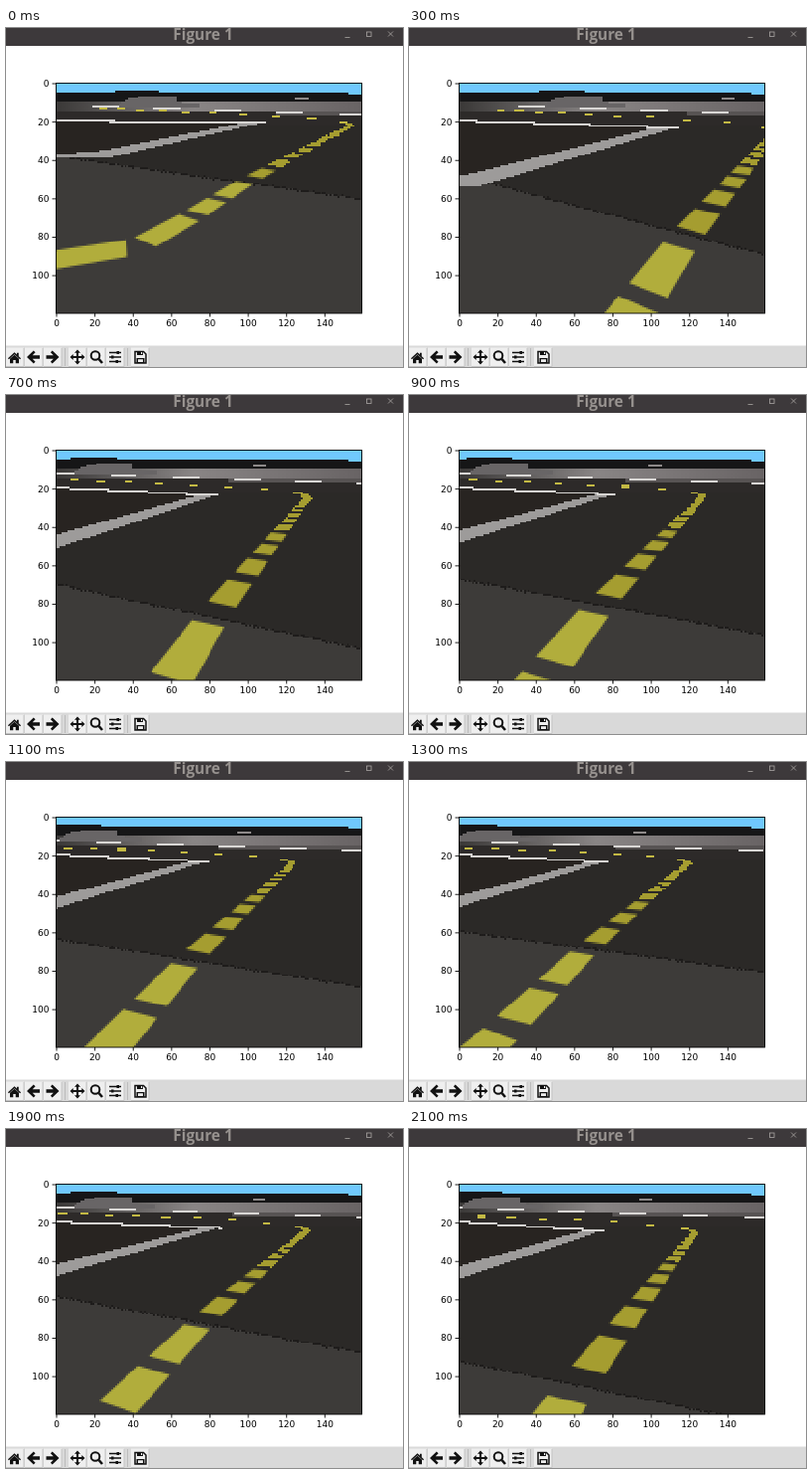
Recreate the animation shown at these times as an HTML page with a canvas. Size 400x341 px, loop 2.2 s.

```html
<!DOCTYPE html>
<html lang="en">
<head>
<meta charset="utf-8">
<title>Figure 1</title>
<style>
html, body { margin: 0; width: 100%; height: 100%; overflow: hidden; background: #fff; }
canvas { position: absolute; left: 50px; top: 55px; width: 309px; height: 232px; image-rendering: pixelated; }
svg { position: absolute; left: 0; top: 0; }
.tick { font: 9px "DejaVu Sans", sans-serif; }
.title { font: bold 15.4px "Open Sans", "Noto Sans", sans-serif; fill: #96918e; }
</style>
</head>
<body>
<canvas id="view" width="160" height="120"></canvas>
<svg width="400" height="341" viewBox="0 0 400 341">
  <rect width="400" height="18" fill="#3d393b"/>
  <text class="title" x="198.500" y="11.500" text-anchor="middle">Figure 1</text>
  <g fill="none" stroke="#aaa6a3" stroke-width=".8">
    <path d="M341.500 9.500h5M385 3.500l5 5m0-5l-5 5"/>
    <rect x="363.500" y="4" width="4.500" height="4.500"/>
  </g>
  <rect x="50.500" y="55.500" width="308" height="231.500" fill="none" stroke="#000" stroke-width=".9"/>
  <g id="axes" stroke-width=".9"></g>
  <rect y="319.500" width="400" height="21.500" fill="#d9d9d9"/>
  <g id="buttons"></g>
  <path d="M59.500 322v18M122.500 322v18" stroke="#bcbcbc"/>
  <g fill="#111" stroke="#111" stroke-width="0">
    <path transform="translate(8.500 331.500) scale(.82) translate(-9 -331)" d="M1 332l8-7.500 3 2.800v-2h2.200v4.200l2.800 2.500-1.200 1.200-6.800-6.200-6.800 6.200zM3.500 332.500l5.500-5 5.500 5v5.500h-4v-4h-3v4h-4z"/>
    <path id="arrow" d="M21 331l6.800-6.500 1.800 1.800-2.900 2.900h7.300v3.600h-7.300l2.900 2.900-1.800 1.800z"/>
    <use href="#arrow" transform="matrix(-1 0 0 1 74.500 0)"/>
    <path d="M72 323.500l3 3.200h-2v3.300h3.300v-2l3.200 3-3.200 3v-2h-3.300v3.300h2l-3 3.200-3-3.200h2v-3.300h-3.300v2l-3.200-3 3.200-3v2h3.300v-3.300h-2z"/>
    <circle cx="90" cy="329.500" r="4.300" fill="none" stroke-width="2"/>
    <path d="M93.500 333l3.500 4" stroke-width="2.600"/>
    <path d="M104 326.500h12M104 331h12M104 335.500h12" stroke-width="1.400"/>
    <path d="M111.500 325h2.500v3h-2.500zM106 329.500h2.500v3h-2.500zM110.500 334h2.500v3h-2.500z"/>
    <path d="M130 325.500h8.500l2.500 2.500v9h-11z" fill="none" stroke-width="1.500"/>
    <path d="M132 325.500h6v3.500h-6zM131.500 332h8v5h-8z"/>
    <path d="M136 326h1.200v2h-1.200zM133 333.300h5v2.700h-5z" fill="#eee"/>
  </g>
</svg>
<script>
const LEFT = 50, TOP = 55, RIGHT = 359, BOTTOM = 287, SCALE = 1.931;
const HORIZON = 68.5, MIDDLE = 204.5, FOCAL = 284;
const STEP = 100, LOOP = 2200;

const toGround = ([x, y]) => [(x - MIDDLE) / (y - HORIZON), FOCAL / (y - HORIZON)];
const toScreen = ([x, z]) => [MIDDLE + x * FOCAL / z, HORIZON + FOCAL / z];
const lerp = (a, b, u) => a + (b - a) * u;
const mix = (a, b, u) => a.map((v, i) => lerp(v, b[i], u));

// A camera pose: where the centre line meets the road joint, where it starts to curl away,
// and the height of the joint at both edges of the picture.
const pose = (t, joint, bend, seam) => ({ t, joint: toGround(joint), bend: toGround(bend), seam });
const poses = [
  pose(0, [245.5, 152], [347, 98], [128.5, 172]),
  pose(300, [278, 210], [370, 104.5], [148, 228]),
  pose(700, [211, 218], [304, 103], [190, 255]),
  pose(900, [194, 209], [296, 102], [185, 241]),
  pose(1300, [181, 186], [281, 102], [170, 211]),
  pose(1900, [199.5, 191], [303, 101.5], [168, 225]),
  pose(2100, [171, 254], [287, 104.5], [233, 296])
];

// Centre line in road units: joint at 0, bend at 1, sideways to the right positive.
function centre(s) {
  if (s < 0) return [s, -0.06 * s - 5.5 * Math.max(0, -0.2 - s) ** 2];
  const u = Math.max(0, s - 1);
  return [Math.min(s, 1) + 0.45 * (1 - Math.exp(-2.2 * u)), -u * u / (u + 0.5)];
}

// Dashes as [start, end] along the centre line.
const dashes = Array.from({ length: 13 }, (_, i) => [0.017 + 0.087 * i, 0.075 + 0.087 * i]);
let end = -0.021;
for (const length of [0.069, 0.044, 0.062, 0.06]) {
  dashes.push([end - length, end]);
  end -= length + 0.016;
}
const HALF_WIDTH = 0.108;

// Side line in road units, flaring out below the joint.
const band = [[-0.03, -0.32], [0.95, -0.385], [0.95, -0.46], [0, -0.4], [-0.1, -0.46], [-0.08, -0.38]];

const ctx = document.getElementById('view').getContext('2d');
const col = x => Math.round((x - LEFT) / SCALE);
const row = y => Math.round((y - TOP) / SCALE);

function box(color, x0, y0, x1, y1) {
  ctx.fillStyle = color;
  ctx.fillRect(col(x0), row(y0), Math.max(1, col(x1) - col(x0)), Math.max(1, row(y1) - row(y0)));
}

// Hard-edged polygon, filled row by row.
function poly(color, pts) {
  ctx.fillStyle = color;
  for (let r = 0; r < 120; r++) {
    const y = TOP + (r + 0.5) * SCALE, cuts = [];
    pts.forEach(([x0, y0], i) => {
      const [x1, y1] = pts[(i + 1) % pts.length];
      if (y0 <= y !== y1 <= y) cuts.push(col(lerp(x0, x1, (y - y0) / (y1 - y0))));
    });
    cuts.sort((a, b) => a - b);
    for (let i = 0; i + 1 < cuts.length; i += 2) ctx.fillRect(cuts[i], r, cuts[i + 1] - cuts[i], 1);
  }
}

function softPoly(color, pts) {
  ctx.fillStyle = color;
  ctx.beginPath();
  for (const [x, y] of pts) ctx.lineTo((x - LEFT) / SCALE, (y - TOP) / SCALE);
  ctx.fill();
}

function drawFar(far, tip) {
  box('#70c8fd', LEFT, TOP, RIGHT, 65);
  box('#161617', LEFT, 65, RIGHT, 77);
  box('#161617', far - 8, 63, far + 38, 65);
  box('#70c8fd', 346, 65, RIGHT, 67);
  const glow = ctx.createLinearGradient(0, 0, 160, 0);
  glow.addColorStop(0, '#3a3837');
  glow.addColorStop(0.45, '#898585');
  glow.addColorStop(1, '#686364');
  box(glow, LEFT, 75, RIGHT, 84);
  poly('#686566', [[far - 8, 80], [far + 4, 72], [far + 18, 69], [far + 54, 69], [far + 54, 75], [far + 78, 76], [far + 78, 80]]);
  box('#8d8989', far + 175, 71, far + 188, 73);
  box('#2d2a29', LEFT, 84, RIGHT, 97);
  box('#575353', tip + 10, 84, RIGHT, 88);
  for (let i = 0; i < 6; i++) {
    const x = far - 30 + 62 * i;
    box('#d9d7d5', x, 79 + 1.6 * i, x + 26, 81 + 1.6 * i);
  }
}

function drawSeam(seamL, seamR) {
  poly('#3d3b39', [[LEFT, seamL], [RIGHT, seamR], [RIGHT, 400], [LEFT, 400]]);
  for (let x = LEFT; x < RIGHT; x += SCALE) {
    const wobble = Math.sin(x * 1.7) + Math.sin(x * 0.61);
    const y = lerp(seamL, seamR, (x - LEFT) / (RIGHT - LEFT)) + wobble / 2;
    if (wobble > -0.4) box('#1e1c1b', x, y - 1, x + 2, y + 1);
  }
}

function drawDash(place, s0, s1) {
  const a = place(centre(s0)), b = place(centre(s1));
  if (Math.min(a[1], b[1]) < 0.5) return;
  const k = HALF_WIDTH / Math.hypot(b[0] - a[0], b[1] - a[1]);
  const nx = (b[1] - a[1]) * k, nz = (a[0] - b[0]) * k;
  const pts = [[a, -1], [a, 1], [b, 1], [b, -1]].map(([p, w]) => toScreen([p[0] + nx * w, p[1] + nz * w]));
  const color = s0 < 0 ? '#b1ad3c' : '#a59d30';
  (a[1] < 4 ? softPoly : poly)(color, pts);
  if (a[1] > 6) {
    const [x, y] = toScreen(mix(a, b, 0.5));
    box(color, x - 4, y, x + 4, y + 2);
  }
}

function draw(time) {
  let n = 0;
  while (n < poses.length - 2 && poses[n + 1].t <= time) n++;
  const a = poses[n], b = poses[n + 1], u = (time - a.t) / (b.t - a.t);
  const joint = mix(a.joint, b.joint, u), bend = mix(a.bend, b.bend, u);
  const dx = bend[0] - joint[0], dz = bend[1] - joint[1];
  const place = ([along, side]) => [joint[0] + along * dx + side * dz, joint[1] + along * dz - side * dx];

  const line = band.map(p => toScreen(place(p)));
  const tip = line[1], rim = 92;
  box('#2b2927', LEFT, TOP, RIGHT, BOTTOM);
  drawFar(toScreen(bend)[0] - 230, tip[0]);
  poly('#282421', [[LEFT, rim], tip, line[0], [LEFT, line[0][1]]]);
  drawSeam(...mix(a.seam, b.seam, u));
  poly('#9d9b9a', line);
  for (let x = LEFT; x < tip[0]; x += SCALE) {
    const y = lerp(rim, tip[1], (x - LEFT) / (tip[0] - LEFT));
    box('#d6d4d2', x, y, x + 2, y + 2);
  }
  for (let s = 1.2; s < 4; s += 0.3) {
    const [x, y] = toScreen(place(centre(s)));
    if (x > LEFT && x < RIGHT) box('#c3b944', x - 4, y - 1, x + 4, y + 1);
  }
  for (const dash of dashes) drawDash(place, ...dash);
}

let axes = '';
for (let i = 0; i < 8; i++) {
  const x = 51 + 38.62 * i, y = 56 + 38.62 * i, label = i * 20;
  axes += `<path d="M${x} 287v3.500" stroke="#000"/><text class="tick" x="${x}" y="300" text-anchor="middle">${label}</text>`;
  if (i < 6) axes += `<path d="M50 ${y}h-3.500" stroke="#000"/><text class="tick" x="43.500" y="${y + 3}" text-anchor="end">${label}</text>`;
}
document.getElementById('axes').innerHTML = axes;
document.getElementById('buttons').innerHTML = [0, 19, 38, 63, 82, 101, 126].map(x =>
  `<rect x="${x}" y="321.500" width="18" height="19" fill="#efefef"/><path d="M${x + 18} 322v18.500h-18" fill="none" stroke="#c4c4c4"/>`).join('');

const begin = performance.now();
let shown = -1;
function tick() {
  const time = Math.floor(Math.max(0, performance.now() - begin) % LOOP / STEP) * STEP;
  if (time !== shown) draw(shown = time);
  requestAnimationFrame(tick);
}
tick();
</script>
</body>
</html>
```
